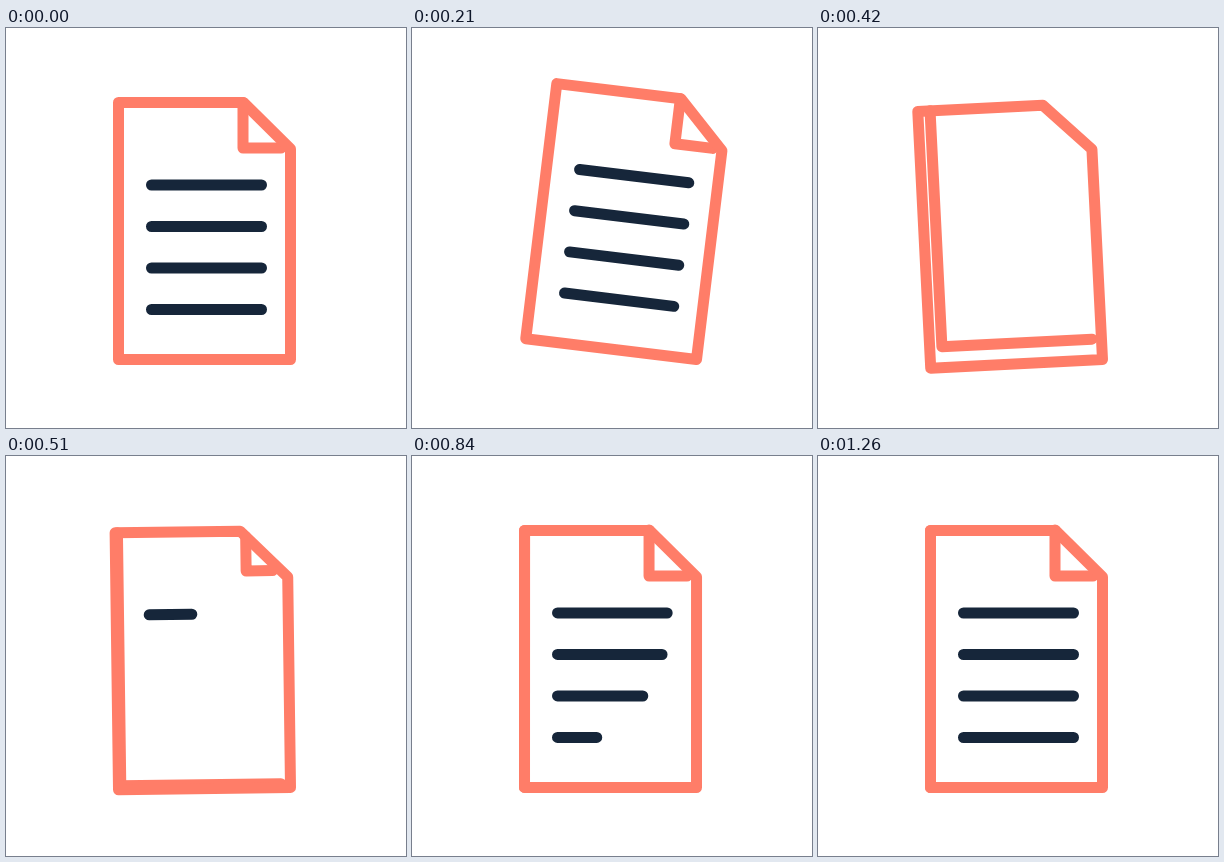
An HTML page that plays this animation: 400 px wide and 400 px high, repeating every 2.83 s.

```html
<!DOCTYPE html>
<html lang="en">
<head>
<meta charset="utf-8">
<title>Document</title>
<style>
  html, body { margin: 0; width: 100%; height: 100%; overflow: hidden; background: #fff; }
  svg { display: block; width: 100%; height: 100%; }
  path { fill: none; stroke-width: 11; stroke-linecap: round; stroke-linejoin: round; }
  .edge { stroke: #ff7d68; }
  .text { stroke: #16263a; }
  .paper { fill: #fff; }
</style>
</head>
<body>
<svg viewBox="0 0 400 400">
  <g id="page">
    <path class="text" d="M145.5 157H255.5M145.5 198.5H255.5M145.5 240H255.5M145.5 281.5H255.5"/>
    <path class="paper" id="sheet"/>
    <path class="edge" id="sheetEdge"/>
    <path class="text" id="lines"/>
    <path class="edge" id="fold"/>
    <path class="edge" d="M112.5 74.5H237.5L284.5 121V331.5H112.5Z"/>
  </g>
</svg>
<script>
const LOOP = 2830, STEP = 30;
const LINE_Y = [157, 198.5, 240, 281.5];
// [time in ms, angle in degrees]
const SWING = [[0, 0], [200, 7], [396, -3], [640, 2], [850, 0]];

const $ = id => document.getElementById(id);
const mix = (a, b, k) => a + (b - a) * k;
const span = (t, start, length) => Math.min(1, Math.max(0, (t - start) / length));
const easeOut = (k, power) => 1 - Math.pow(1 - k, power);
const easeSine = k => (1 - Math.cos(Math.PI * k)) / 2;

function angleAt(t) {
  for (let i = 1; i < SWING.length; i++) {
    const [t0, a0] = SWING[i - 1], [t1, a1] = SWING[i];
    if (t < t1) return mix(a0, a1, easeSine(span(t, t0, t1 - t0)));
  }
  return 0;
}

function draw(t) {
  $('page').setAttribute('transform', `rotate(${angleAt(t)} 284.5 331.5)`);

  // the folded corner sweeps across the page and becomes the new sheet
  const sweep = easeOut(span(t, 220, 480), 4.3);
  const x = mix(237, 112.5, sweep), y = mix(120, 331.5, sweep);
  $('sheet').setAttribute('d', `M${x} 74.5V${y}H284.5V121L237.5 74.5Z`);
  $('sheetEdge').setAttribute('d', `M${x} 74.5V${y}H275`);

  // a new corner opens out of the diagonal
  const open = easeOut(span(t, 420, 180), 2);
  const fx = mix(261, 237, open), fy = mix(97.5, 120, open);
  $('fold').setAttribute('d', open ? `M${fx} ${fx - 163}V${fy}H${Math.max(fx, fy + 155)}` : '');

  $('lines').setAttribute('d', LINE_Y.map((ly, i) => {
    const k = easeOut(span(t, 446 + i * 112, 490), 3.5);
    return k ? `M145.5 ${ly}h${110 * k}` : '';
  }).join(''));
}

const began = performance.now();
function tick() {
  const t = (performance.now() - began) % LOOP;
  draw(Math.floor(t / STEP) * STEP);
  requestAnimationFrame(tick);
}
tick();
</script>
</body>
</html>
```
